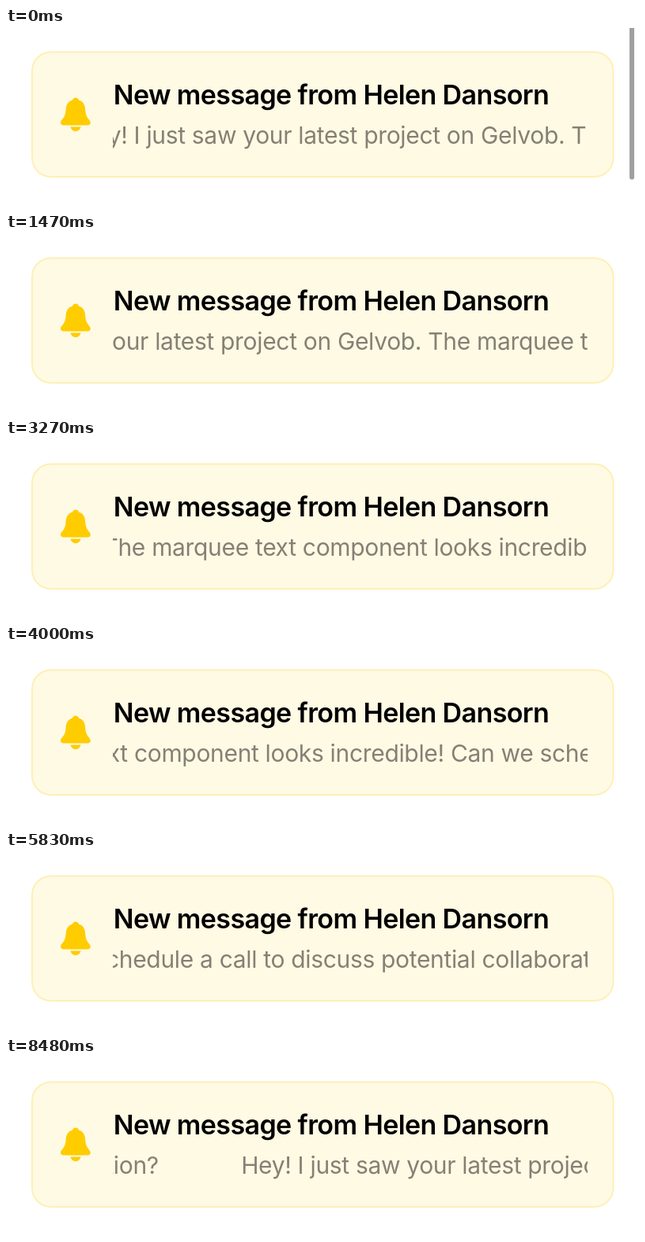
An HTML page that plays this animation: 800x226 px, repeating every 8.52 s.

```html
<!DOCTYPE html>
<html lang="en">
<head>
<meta charset="utf-8">
<title>Notification marquee</title>
<style>
  html, body { margin: 0; width: 100%; height: 100%; overflow: hidden; background: #fff; }
  svg { display: block; font-family: Inter, Roboto, sans-serif; }
  .title { font-size: 34px; font-weight: 600; letter-spacing: -.6px; fill: #000; }
  .message { font-size: 30px; letter-spacing: -.33px; fill: #858075; }
</style>
</head>
<body>
<svg width="800" height="226" viewBox="0 0 800 226">
  <clipPath id="window"><rect x="135" y="110" width="600" height="60"/></clipPath>
  <rect x="33" y="30.5" width="734.5" height="158.5" rx="24" fill="#fffae4" stroke="#fdf0b8" stroke-width="2"/>
  <g fill="#fc0">
    <path d="M73 123.4Q69 123.4 69 120C69 116.5 75 115 75.6 104C76 96.5 79 93 84 91.5C84.5 89.5 86 88.4 88 88.4S91.5 89.5 92 91.5C97 93 99.8 96.5 100.2 104C100.8 115 106.8 116.5 106.8 120Q106.8 123.4 103 123.4Z"/>
    <path d="M81.5 125.6H94.5C94 129 91 131.2 88 131.2S82 129 81.5 125.6Z"/>
  </g>
  <text class="title" x="135.7" y="97">New message from Helen Dansorn</text>
  <g clip-path="url(#window)">
    <g id="strip" class="message">
      <text y="147"></text>
      <text y="147"></text>
    </g>
  </g>
  <rect id="scrollbar" x="788" y="-10" width="6" height="202.5" rx="3" fill="#a0a0a0"/>
</svg>
<script>
const LOOP = 8520;       // visible part of the scroll
const DURATION = 12000;  // one full eased pass
const LEAD = 1225;       // time already elapsed when the loop begins
const PERIOD = 2179;     // distance between the two copies
const LEFT = 135;
const MESSAGE = 'Hey! I just saw your latest project on Gelvob. The marquee text component ' +
  'looks incredible! Can we schedule a call to discuss potential collaboration?';

const strip = document.getElementById('strip');
const scrollbar = document.getElementById('scrollbar');
[...strip.children].forEach((copy, i) => {
  copy.textContent = MESSAGE;
  copy.setAttribute('x', LEFT + i * PERIOD);
});

// cubic-bezier(.42, 0, .58, 1), solved by bisection
function easeInOut(x) {
  let lo = 0, hi = 1;
  for (let i = 0; i < 30; i++) {
    const s = (lo + hi) / 2, r = 1 - s;
    if (1.26 * s * r * r + 1.74 * s * s * r + s ** 3 < x) lo = s;
    else hi = s;
  }
  return lo * lo * (3 - 2 * lo);
}

function draw(now) {
  const t = now % LOOP;
  const shift = PERIOD * easeInOut((t + LEAD) / DURATION);
  strip.setAttribute('transform', `translate(${-shift} 0)`);
  scrollbar.setAttribute('opacity', Math.min(1, Math.max(0, 1 - (t - 30) / 300)));
}

const start = performance.now();
function tick() {
  draw(performance.now() - start);
  requestAnimationFrame(tick);
}
tick();
</script>
</body>
</html>
```
